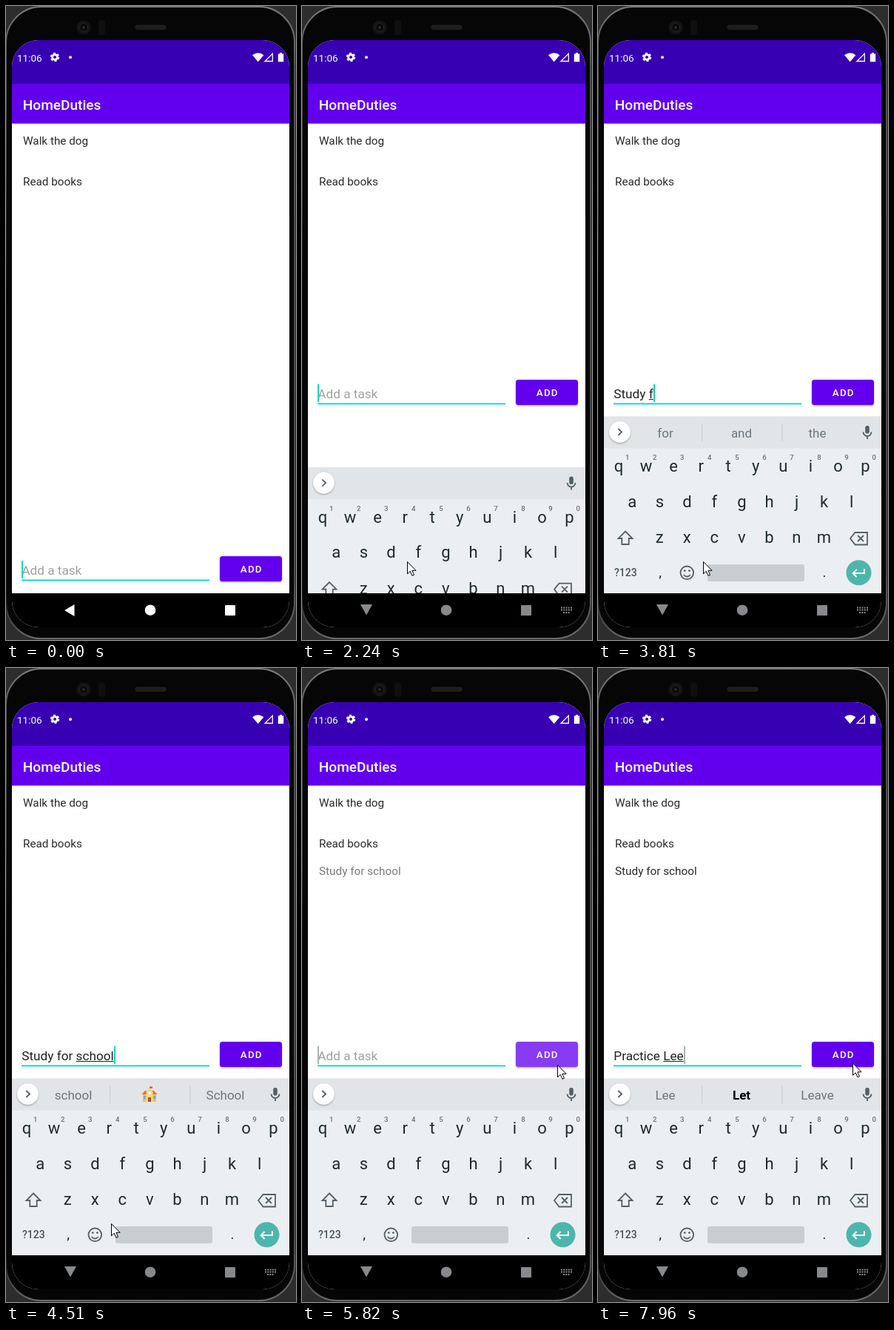
An HTML page for the animation above (8000 ms loop, 392 by 855 pixels).

```html
<!DOCTYPE html>
<html lang="en">
<head>
<meta charset="utf-8">
<title>Task list</title>
<style>
  html, body { margin: 0; width: 100%; height: 100%; overflow: hidden; background: #2d2d2d; }
  svg { display: block; width: 100vw; height: 100vh; }
  text { font-family: Roboto, sans-serif; white-space: pre; }
  .mid { text-anchor: middle; }
  .line { fill: none; stroke: #536067; stroke-width: 1.8; }
</style>
</head>
<body>
<svg viewBox="0 0 392 855">
  <defs>
    <clipPath id="screen"><path d="M8 82A36 36 0 0 1 44 46H347A36 36 0 0 1 383 82V802A36 36 0 0 1 347 838H44A36 36 0 0 1 8 802Z"/></clipPath>
    <clipPath id="aboveNav"><rect x="8" y="504" width="375" height="288"/></clipPath>
    <linearGradient id="leftEdge" x2="0" y2="1">
      <stop offset="0" stop-color="#7c7c7c"/><stop offset=".06" stop-color="#5a5a5a"/>
      <stop offset=".28" stop-color="#3a3a3a"/><stop offset=".45" stop-color="#101010"/>
      <stop offset=".93" stop-color="#181818"/><stop offset="1" stop-color="#6c6c6c"/>
    </linearGradient>
    <linearGradient id="rightEdge" x2="0" y2="1">
      <stop offset="0" stop-color="#7c7c7c"/><stop offset=".1" stop-color="#505050"/>
      <stop offset=".9" stop-color="#484848"/><stop offset="1" stop-color="#6c6c6c"/>
    </linearGradient>
    <linearGradient id="barShadow" x2="0" y2="1">
      <stop offset="0" stop-opacity=".14"/><stop offset="1" stop-opacity="0"/>
    </linearGradient>
    <filter id="shadow" x="-20%" y="-20%" width="140%" height="160%">
      <feDropShadow dx="0" dy="1.2" stdDeviation="1.1" flood-opacity=".35"/>
    </filter>
  </defs>

  <!-- phone body -->
  <rect width="392" height="855" fill="#2d2d2d"/>
  <rect x="0" y="1" width="390.5" height="852.5" rx="48" fill="#060606"/>
  <g fill="none" stroke-width="2">
    <path d="M196 1H48A48 48 0 0 0 0 49V805A48 48 0 0 0 48 853H196" stroke="url(#leftEdge)"/>
    <path d="M195 1H342A48 48 0 0 1 390 49V805A48 48 0 0 1 342 853H195" stroke="url(#rightEdge)"/>
  </g>
  <circle cx="105" cy="29" r="9.5" fill="#141414"/>
  <circle cx="105" cy="29" r="5.5" fill="#0a0a0b" stroke="#242426"/>
  <circle cx="105" cy="29" r="1.8" fill="#303035"/>
  <rect x="125" y="19" width="9" height="20" rx="4" fill="#0f0f0f"/>
  <rect x="175" y="26" width="41" height="5.5" rx="2.5" fill="#1d1d1d" stroke="#262626" stroke-width=".8"/>

  <g clip-path="url(#screen)">
    <rect x="8" y="45" width="375" height="794" fill="#fff"/>
    <rect x="8" y="45" width="375" height="60" fill="#3700b3"/>
    <rect x="8" y="105" width="375" height="53.5" fill="#6200ee"/>
    <rect x="8" y="158.5" width="375" height="2" fill="url(#barShadow)"/>
    <rect x="8" y="792" width="375" height="47"/>

    <g fill="#fff">
      <text x="15" y="74.8" font-size="13.5">11:06</text>
      <circle cx="66" cy="69" r="3.4" fill="none" stroke="#fff" stroke-width="2.8"/>
      <circle cx="66" cy="69" r="5.2" fill="none" stroke="#fff" stroke-width="2" stroke-dasharray="2.9 2.545"/>
      <circle cx="87" cy="69.2" r="2"/>
      <path d="M333 66.3Q340.7 60 348.4 66.3L340.7 75.3Z"/>
      <path d="M360.3 64.2V74.5H350Z" fill="none" stroke="#fff" stroke-width="1.3"/>
      <path d="M367.8 64.5H370V63H373V64.5H375.2V75.3H367.8Z"/>
      <text x="22.7" y="139.5" font-size="19.1" font-weight="500">HomeDuties</text>
    </g>

    <g font-size="15.3" fill="#2a2a2a">
      <text x="23" y="187.3">Walk the dog</text>
      <text x="23" y="242.1">Read books</text>
      <text id="newItem" x="23" y="279">Study for school</text>
    </g>

    <g id="inputRow">
      <text id="hint" x="21.3" y="766.8" font-size="17.2" fill="#a0a0a0">Add a task</text>
      <text id="typed" x="21.3" y="766.8" font-size="17.2" fill="#212121"></text>
      <rect id="composing" y="768" height="1" fill="#212121"/>
      <rect x="21" y="773.5" width="254" height="1.9" fill="#03dac5"/>
      <rect id="caret" y="748" width="2" height="24"/>
      <rect id="button" x="289" y="742" width="84" height="34" rx="3.5" filter="url(#shadow)"/>
      <text x="316.8" y="764.3" font-size="13.4" font-weight="500" letter-spacing="1.2" fill="#fff">ADD</text>
    </g>

    <g clip-path="url(#aboveNav)"><g id="keyboard">
      <rect x="8" y="553.5" width="375" height="239" fill="#eceff1"/>
      <rect x="8" y="553.5" width="375" height="43" fill="#e1e5e8"/>
      <circle cx="29.5" cy="574.5" r="14.3" fill="#fff" filter="url(#shadow)"/>
      <path class="line" d="M27.3 570L32 574.5L27.3 579"/>
      <g id="strip">
        <path d="M140.5 563V587M249 563V587" stroke="#c5cbce"/>
        <g id="words" class="mid" font-size="17"></g>
        <g id="school">
          <path d="M185 574H203V585H185Z" fill="#f3bd55"/>
          <path d="M183.5 575L188 570H200L204.5 575Z" fill="#df7547"/>
          <path d="M189.5 585V571L194 567L198.5 571V585Z" fill="#ffd576"/>
          <path d="M194 568V564.5H198V567H194" fill="#e3553f"/>
          <circle cx="194" cy="573" r="1.9" fill="#fff"/>
          <path d="M192 579H196V585H192Z" fill="#8d5a43"/>
          <path d="M186 577H188.5V581H186ZM199.5 577H202V581H199.5Z" fill="#6fa9c9"/>
        </g>
      </g>
      <g fill="#536067">
        <rect x="361.2" y="566" width="5.6" height="10.5" rx="2.8"/>
        <path class="line" d="M358.5 574.5A5.5 5.5 0 0 0 369.5 574.5M364 580V584"/>
      </g>
      <g id="keys" class="mid" fill="#1d2b31" font-size="22"></g>
      <path class="line" d="M37 708.5L46.5 718H41.7V726H32.3V718H27.5Z"/>
      <path class="line" d="M341 718L347.5 710H364V726.5H347.5ZM351 714L359 722M359 714L351 722"/>
      <text class="mid" x="37.3" y="769.3" font-size="14" font-weight="500" fill="#47555c">?123</text>
      <circle class="line" cx="120.3" cy="764.3" r="8.8"/>
      <path class="line" d="M115.8 767Q120.3 772 124.8 767"/>
      <circle cx="117.2" cy="761.6" r="1.4" fill="#536067"/>
      <circle cx="123.4" cy="761.6" r="1.4" fill="#536067"/>
      <rect x="148" y="753" width="131" height="23" rx="3" fill="#c8cdd0"/>
      <circle cx="352.5" cy="764.3" r="17" fill="#4db6ac"/>
      <path d="M360 759V765H345M349.5 760L344.7 765L349.5 770" fill="none" stroke="#fff" stroke-width="2"/>
    </g></g>

    <g id="nav">
      <path id="back"/>
      <circle cx="195" cy="814.7" r="7.3"/>
      <rect x="296" y="808" width="14" height="14" rx="1"/>
      <path id="imeIcon" d="M350 811.5H365M350 814.5H365M353 818H362" stroke-width="2" stroke-dasharray="2 1.25"/>
    </g>
  </g>

  <path id="pointer" d="M0 0V16.3L3.8 12.8L6.4 18.8L9 17.7L6.4 11.8H11.6Z" fill="#fff" stroke="#000" stroke-width="1"/>
</svg>

<script>
const LOOP = 8000, KEYBOARD_AT = 2170, CLEAR_AT = 5680, STRIP_LAG = 70, ROW_LIFT = 238;
const $ = id => document.getElementById(id);
const clamp = x => Math.max(0, Math.min(1, x));
const ramp = (t, a, b) => clamp((t - a) / (b - a));
const mix = (a, b, k) => a + (b - a) * k;
const grey = v => `rgb(${v},${v},${v})`;

function addText(parent, x, y, value, attrs = {}) {
  const el = document.createElementNS('http://www.w3.org/2000/svg', 'text');
  Object.entries({ x, y, ...attrs }).forEach(([k, v]) => el.setAttribute(k, v));
  el.textContent = value;
  parent.append(el);
  return el;
}

// Key caps
[['qwertyuiop', 28, 628], ['asdfghjkl', 46.3, 675.5], ['zxcvbnm', 83.2, 724]].forEach(([row, x0, y], r) =>
  [...row].forEach((ch, i) => {
    const x = x0 + i * 37.05;
    addText($('keys'), x, y, ch);
    if (r === 0) addText($('keys'), x + 11.7, 612, (i + 1) % 10, { 'font-size': 9.6, 'font-weight': 500, fill: '#66737a' });
  }));
addText($('keys'), 84, 770, ',', { 'font-size': 19 });
addText($('keys'), 306, 770, '.', { 'font-size': 19 });
const words = [91, 194, 296.5].map(x => addText($('words'), x, 581.8, ''));

// Text states: [time, text]
const edits = [[0, ''], [2710, 'S'], [2780, 'St'], [3050, 'Stu'], [3130, 'Stud'], [3270, 'Study']];
function type(base, added, start, end) {
  [...added].forEach((_, i) =>
    edits.push([mix(start, end, i / (added.length - 1)), base + added.slice(0, i + 1)]));
}
type('Study', ' for school', 3670, 4440);
edits.push([CLEAR_AT, '']);
type('', 'Prac', 6680, 6950);
type('Prac', 'tice Lee', 7220, 7890);
const editAt = t => edits.findLast(e => e[0] <= t) || edits[0];

// Suggestions by current word; * marks the bold middle choice
const suggestions = {
  S: 'S,So,She', St: 'St,Still,Stuff', Stu: 'Stu,Stuff,Study', Stud: 'Stud,Study,Studying',
  Study: 'Study,Studying,Study\u2019s', 'Study ': 'for,and,the', f: 'f,for,from', fo: 'fo,for,food',
  for: 'for,for the,forward', 'for ': 'the,a,my', s: 's,so,some', sc: 'sc,school,science',
  sch: 'sch,school,schedule', scho: 'scho,school,scholarship', schoo: 'schoo,*school,School',
  school: 'school,,School', P: 'P,Please,People', Pr: 'Pr,Pretty,Probably', Pra: 'Pra,Pray,Practice',
  Prac: 'Prac,*Practice,Practicing', Pract: 'Pract,*Practice,Practicing',
  Practi: 'Practi,*Practice,Practicing', Practic: 'Practic,*Practice,Practical',
  Practice: 'Practice,Practices,Practiced', 'Practice ': 'is,for,and', L: 'L,Let,Love',
  Le: 'Le,Let,Left', Lee: 'Lee,*Let,Leave'
};

// Pointer path: [time, x, y]
const path = [[660, 332, 793], [940, 182, 757], [1150, 182, 757], [1560, 141, 750], [1630, 141, 750],
  [1730, 142, 738], [1830, 142, 749], [4840, 142, 749], [5320, 350, 542], [5460, 345, 535],
  [5900, 345, 535], [6150, 344, 532.5]];
function pointerAt(t) {
  const i = path.findLastIndex(p => p[0] <= t);
  const a = path[Math.max(i, 0)], b = path[i + 1] || a;
  const k = a === b ? 0 : ramp(t, a[0], b[0]), s = k * k * (3 - 2 * k);
  return [mix(a[1], b[1], s), mix(a[2], b[2], s)];
}

function caretOn(t, editTime) {
  const since = t < KEYBOARD_AT ? t + 240 : t - Math.max(editTime, 2200);
  return since < 0 || since % 1000 < 500;
}

function drawInput(t) {
  const [editTime, text] = editAt(t);
  const typed = $('typed');
  if (typed.textContent !== text) typed.textContent = text;
  $('hint').style.display = text ? 'none' : '';
  const width = text ? typed.getComputedTextLength() : 0;
  const wordStart = text.lastIndexOf(' ') + 1;
  const before = wordStart && wordStart < text.length ? typed.getSubStringLength(0, wordStart) : 0;
  $('composing').setAttribute('x', 21.3 + before);
  $('composing').setAttribute('width', wordStart < text.length ? width - before : 0);

  const caret = $('caret');
  const faded = (t > 5750 && t < 6000) || t >= 7950;
  caret.setAttribute('x', Math.ceil(21 + width));
  caret.setAttribute('fill', faded ? '#a9b3b1' : '#03dac5');
  caret.style.display = caretOn(t, editTime) ? '' : 'none';

  const glow = ramp(t, 5590, 5720) * (1 - ramp(t, 5900, 6220));
  $('button').setAttribute('fill', `rgb(${mix(98, 135, glow)},${mix(0, 58, glow)},${mix(238, 242, glow)})`);
  $('inputRow').setAttribute('transform', `translate(0 ${t < KEYBOARD_AT ? 0 : -ROW_LIFT})`);
}

function drawKeyboard(t) {
  const text = editAt(t - STRIP_LAG)[1];
  const word = (text.match(/\S+ ?$/) || [''])[0];
  const list = suggestions[word];
  $('strip').style.display = list ? '' : 'none';
  $('school').style.display = word === 'school' ? '' : 'none';
  if (list) list.split(',').forEach((s, i) => {
    const bold = s[0] === '*';
    words[i].textContent = bold ? s.slice(1) : s;
    words[i].setAttribute('font-weight', bold ? 700 : 400);
    words[i].setAttribute('fill', bold ? '#000' : '#6b777d');
  });
  const hidden = (1 - ramp(t, KEYBOARD_AT - 50, 2380)) ** 2;
  $('keyboard').style.display = t < KEYBOARD_AT ? 'none' : '';
  $('keyboard').setAttribute('transform', `translate(0 ${240 * hidden})`);
}

function drawNav(t) {
  const open = t >= KEYBOARD_AT;
  const color = open ? '#868a8d' : grey(mix(255, 214, ramp(t, 1150, 1560)));
  $('nav').setAttribute('fill', color);
  $('imeIcon').setAttribute('stroke', color);
  $('imeIcon').style.display = open ? '' : 'none';
  $('back').setAttribute('d', open ? 'M79 807H95L87 821.5Z' : 'M79 815L92.5 807V823Z');
}

function draw(t) {
  drawInput(t);
  drawKeyboard(t);
  drawNav(t);
  $('newItem').setAttribute('opacity', ramp(t, 5690, 5900));
  const [x, y] = pointerAt(t);
  $('pointer').style.display = t < 660 ? 'none' : '';
  $('pointer').setAttribute('transform', `translate(${x + .5} ${y + .5})`);
}

const start = performance.now();
function tick() {
  draw((performance.now() - start) % LOOP);
  requestAnimationFrame(tick);
}
tick();
</script>
</body>
</html>
```
